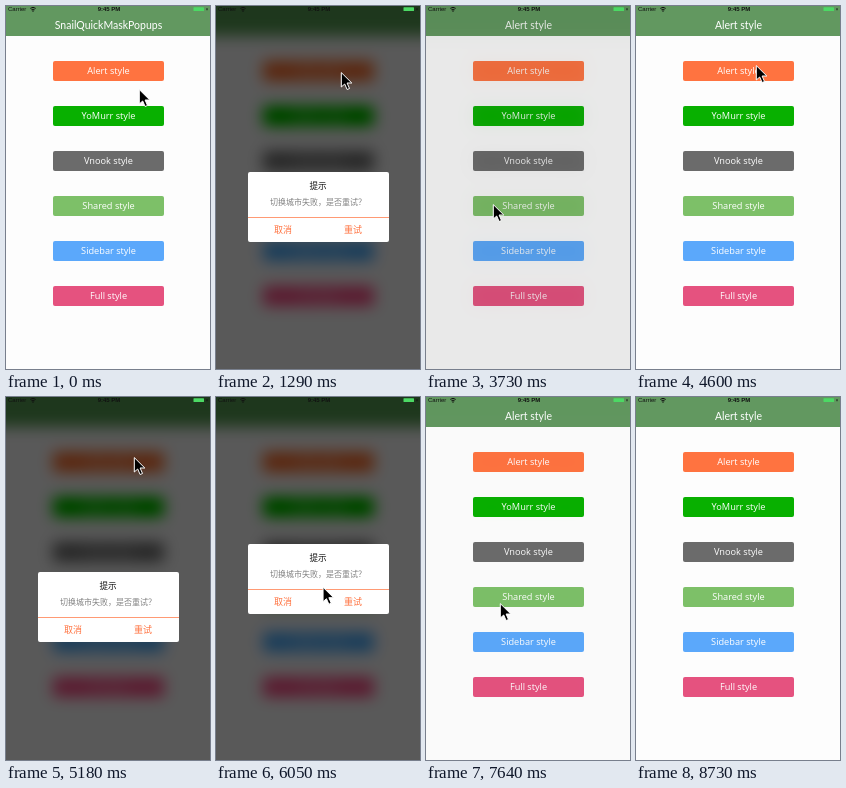
These frames come from a looping animation (204x363 px, 9.24 s). An HTML page:

```html
<!DOCTYPE html>
<html lang="en">
<head>
<meta charset="utf-8">
<title>Popup styles</title>
<style>
  html, body { margin: 0; width: 100%; height: 100%; overflow: hidden; }
  #stage { position: relative; width: 204px; height: 363px; overflow: hidden; background: #fdfdfd; }
  #stage div, #stage svg { position: absolute; }
  .text { white-space: nowrap; text-align: center; }
  .bar { left: -50px; top: -50px; width: 304px; height: 80px; background: #629860; }
  #title { left: 0; top: 12px; width: 205px; font: 10.5px/14px Lato, sans-serif; color: #fff; }
  .button { left: 47px; width: 111px; height: 20px; border-radius: 2px; color: #fff;
            font: 9.2px/19px "Open Sans", sans-serif; }
  #mask { inset: 0; overflow: hidden; }
  /* a blurred, darkened copy of the page, larger than the stage so its edges stay clean */
  #blur { inset: -50px; background: #fdfdfd; filter: blur(7.5px) saturate(1.35) brightness(.352); }
  #copy { left: 50px; top: 50px; }
  #status { left: 0; top: 0; }
  #popup { left: 32px; top: 0; width: 141px; height: 70px; background: #fff; border-radius: 2px;
           font-family: "Noto Sans CJK SC", "Noto Sans CJK", sans-serif; line-height: 12px; }
  #popup .head { left: 0; width: 140px; top: 7px; font-size: 8.6px; color: #111; }
  #popup .body { left: 0; width: 140px; top: 24px; font-size: 8px; color: #808080; }
  #popup .rule { left: 0; top: 45px; width: 141px; height: 1px; background: #ff9a74; }
  #popup .act { top: 51.5px; width: 70px; font-size: 9px; color: #ff7340; }
</style>
</head>
<body>
<div id="stage">
  <div id="page"></div>
  <div id="title" class="text"></div>
  <div id="mask"><div id="blur"><div id="copy"></div></div></div>
  <svg id="status" width="204" height="8">
    <g font-family="Liberation Sans, sans-serif" font-size="6" fill="#111">
      <text x="2" y="5.2">Carrier</text>
      <text x="103" y="5.2" text-anchor="middle" font-weight="bold">9:45 PM</text>
    </g>
    <path d="M24.3 2.4Q27 .2 29.7 2.4M25.4 3.8Q27 2.5 28.6 3.8" fill="none" stroke="#111"/>
    <circle cx="27" cy="5" r=".8" fill="#111"/>
    <rect x="187.5" y="1.2" width="10.5" height="3.8" rx=".6" fill="#4cd964"/>
    <rect x="200.5" y="2.2" width="1" height="2" fill="#111"/>
  </svg>
  <div id="popup">
    <div class="text head">提示</div>
    <div class="text body">切换城市失败，是否重试？</div>
    <div class="rule"></div>
    <div id="cancel" class="text act" style="left:0">取消</div>
    <div class="text act" style="left:70px">重试</div>
  </div>
  <svg id="cursor" width="16" height="22" viewBox="-1 -1 16 22" style="left:-1px;top:-1px">
    <path d="M.3 .6V15L3.7 12 6.1 17.5 8.5 16.5 6.1 11H10.8Z" stroke="#fff"/>
  </svg>
</div>
<script>
const LOOP = 9240;
const REST = 147;
const $ = id => document.getElementById(id);
const [title, mask, popup, cancel, cursor] =
  ["title", "mask", "popup", "cancel", "cursor"].map($);

const buttons = {
  "Alert style": "#ff7340",
  "YoMurr style": "#08b000",
  "Vnook style": "#6b6b6b",
  "Shared style": "#7dc068",
  "Sidebar style": "#5ba8fb",
  "Full style": "#e5527f",
};

function addBox(parent, className) {
  const el = document.createElement("div");
  el.className = className;
  return parent.appendChild(el);
}

function buildPage(parent) {
  addBox(parent, "bar");
  Object.entries(buttons).forEach(([label, color], i) => {
    const el = addBox(parent, "button text");
    el.style.top = 55 + 45 * i + "px";
    el.style.background = color;
    el.textContent = label;
  });
}
buildPage($("page"));
buildPage($("copy"));

// pointer moves: start, end, x, y reached
const home = [133, 83];
const moves = [
  [0, 580, 125, 66], [1690, 1910, 130, 92], [1910, 2660, 67, 198],
  [3760, 4310, 117, 52], [4480, 4600, 120, 59], [4950, 5150, 128, 60],
  [5300, 5640, 147, 66], [5820, 6170, 92, 235], [6480, 6700, 82, 218],
  [6890, 7110, 74, 206], [8300, 8730, 180, 366],
];

const shows = [
  { open: 1000, press: 3140, release: 3440, close: 3730 },
  { open: 4950, press: 7110, release: 7410, close: 7520 },
];
const FADE = 180;

const clamp = v => Math.max(0, Math.min(1, v));
const ease = k => k * k * (3 - 2 * k);

function pointerAt(t) {
  let [x, y] = home;
  for (const [from, to, toX, toY] of moves) {
    const k = ease(clamp((t - from) / (to - from)));
    x += (toX - x) * k;
    y += (toY - y) * k;
  }
  return [x, y];
}

// damped spring dropping in from above, s in seconds
function spring(s) {
  const a = 8.2, b = 12.4;
  return -222 * Math.exp(-a * s) * (Math.cos(b * s) + a / b * Math.sin(b * s));
}

function render(t) {
  title.textContent = t < 820 ? "SnailQuickMaskPopups" : "Alert style";

  const show = shows.find(s => t >= s.open && t < s.close + FADE);
  const isOpen = show && t < show.close;
  popup.style.display = isOpen ? "" : "none";
  let alpha = 0;
  if (isOpen) {
    const age = t - show.open + 30;
    alpha = clamp(age / 230);
    popup.style.transform = `translateY(${Math.round(REST + spring(age / 1000))}px)`;
    cancel.style.opacity = t >= show.press && t < show.release ? 0.3 : 1;
  } else if (show) {
    alpha = 0.12 * (1 - (t - show.close) / FADE) ** 2;
  }
  mask.style.opacity = alpha;

  const [x, y] = pointerAt(t);
  cursor.style.transform = `translate(${x}px, ${y}px)`;
}

const start = performance.now();
function tick() {
  render((performance.now() - start) % LOOP);
  requestAnimationFrame(tick);
}
tick();
</script>
</body>
</html>
```
